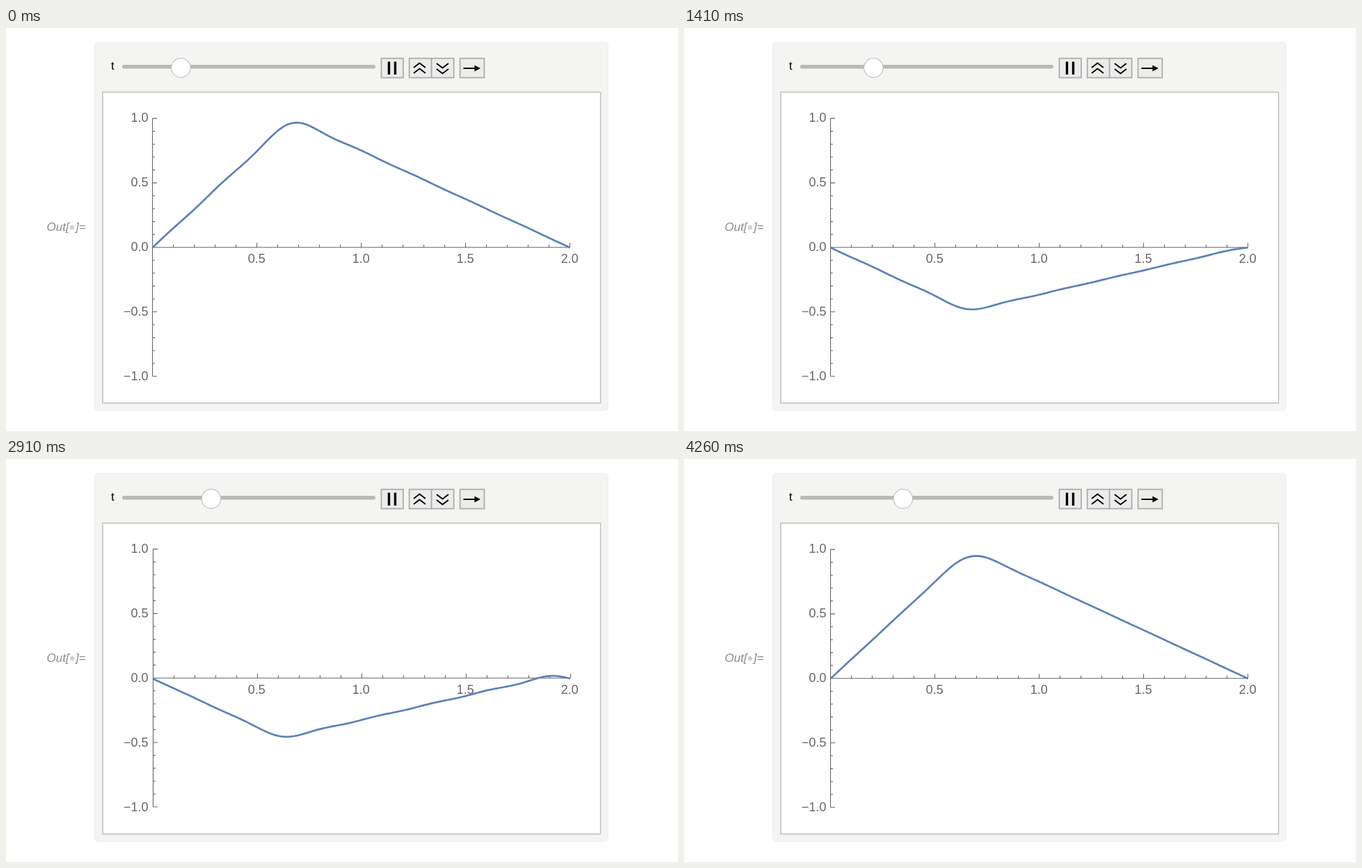
An HTML page for the animation above (4.29 s loop, 966 by 580 pixels).

```html
<!DOCTYPE html>
<html>
<head>
<meta charset="utf-8">
<style>
html, body { margin: 0; width: 100%; height: 100%; overflow: hidden; background: #fff; }
svg { display: block; }
text { font-family: "Liberation Sans", Arial, sans-serif; font-size: 18px; fill: #666; }
.out { font-size: 17px; font-style: italic; fill: #8c8c8c; }
.button { fill: #ececeb; stroke: #adadad; stroke-width: 1.8; }
.icon { fill: none; stroke: #000; stroke-width: 2; }
</style>
</head>
<body>
<svg width="966" height="580" viewBox="0 0 966 580">
  <rect x="127.5" y="20.5" width="738" height="530" rx="5" fill="#f4f4f3" stroke="#efefee"/>
  <rect x="139" y="92.3" width="715.6" height="447.4" fill="#fff" stroke="#bcbcba" stroke-width="1.4"/>

  <text x="58.5" y="292" class="out">Out[</text>
  <circle cx="95" cy="287" r="3.2" fill="#d0d0d0"/>
  <text x="100" y="292" class="out">]=</text>

  <text x="151" y="60" style="font-size:17px;fill:#000">t</text>
  <rect x="167" y="53" width="364" height="5.6" rx="2.5" fill="#b9b9b8"/>
  <circle id="thumb" cy="57.3" r="13.8" fill="#fff" stroke="#bdbdbd" stroke-width="1.1"/>

  <g class="button">
    <rect x="539.5" y="43.7" width="31.5" height="27.8"/>
    <rect x="579.7" y="43.7" width="32" height="27.8"/>
    <rect x="611.7" y="43.7" width="32" height="27.8"/>
    <rect x="652.7" y="43.7" width="34.8" height="27.8"/>
  </g>
  <g class="icon">
    <path d="M550.5 48.5v18.5M559.5 48.5v18.5" stroke-width="3.4"/>
    <path d="M586 57l8.5-6.5 8.5 6.5M586 65l8.5-6.5 8.5 6.5"/>
    <path d="M619 51l8.5 6.5 8.5-6.5M619 59l8.5 6.5 8.5-6.5"/>
    <path d="M657.5 58h18"/>
    <path d="M673.5 53.5l8.5 4.5-8.5 4.5z" fill="#000" stroke="none"/>
  </g>

  <path id="axes" fill="none" stroke="#666" stroke-width="1.1"/>
  <g id="labels"></g>
  <path id="curve" fill="none" stroke="#5e81b5" stroke-width="2.7" stroke-linejoin="round"/>
</svg>
<script>
const $ = id => document.getElementById(id);
const LOOP = 4290, TERMS = 15, LENGTH = 2, PLUCK = 2 / 3;
const X_UNIT = 300, Y_UNIT = 185.6;

// Times (ms) and how far the wave has travelled by then
const travel = [[0, .025], [420, .403], [960, .906], [1950, 1.824],
                [2910, 2.715], [3600, 3.358], [4260, 3.945]];
// Spans in which the picture stands still
const holds = [[0, 90], [420, 510], [540, 630], [960, 1050], [1620, 1830],
               [1950, 2040], [2820, 2910], [3390, 3480], [3600, 3690]];

function heldTime(ms) {
  const hold = holds.find(([from, to]) => ms >= from && ms < to);
  return hold ? hold[0] : Math.floor(ms / 30) * 30;
}

function travelled(ms) {
  const i = Math.max(1, travel.findIndex(key => key[0] >= ms));
  const [t0, s0] = travel[i - 1], [t1, s1] = travel[i];
  return s0 + (s1 - s0) * (ms - t0) / (t1 - t0);
}

// Fourier series of a string plucked at PLUCK to height 1
const scale = 2 * LENGTH ** 2 / (Math.PI ** 2 * PLUCK * (LENGTH - PLUCK));
function height(x, s) {
  let sum = 0;
  for (let n = 1; n <= TERMS; n++) {
    const k = n * Math.PI / LENGTH;
    sum += Math.sin(k * PLUCK) / n ** 2 * Math.sin(k * x) * Math.cos(k * s);
  }
  return scale * sum;
}

function axesPath(x0, y0) {
  let d = `M${x0} ${y0 - Y_UNIT}V${y0 + Y_UNIT}M${x0} ${y0}h${2 * X_UNIT}`;
  for (let i = -10; i <= 10; i++)
    d += `M${x0} ${y0 - i * Y_UNIT / 10}h${i % 5 ? 3.5 : 6.5}`;
  for (let i = 1; i <= 20; i++)
    d += `M${x0 + i * X_UNIT / 10} ${y0}v${i % 5 ? -4 : -6.5}`;
  return d;
}

function label(value, x, y, anchor) {
  const text = value.toFixed(1).replace("-", "\u2212");
  return `<text x="${x}" y="${y}" text-anchor="${anchor}">${text}</text>`;
}

$("labels").innerHTML =
  [-1, -.5, 0, .5, 1].map(v => label(v, 204.5, 321 - v * Y_UNIT, "end")).join("") +
  [.5, 1, 1.5, 2].map(v => label(v, 210.3 + v * X_UNIT, 338.3, "middle")).join("");

function draw(ms) {
  const s = travelled(heldTime(ms));
  const heights = Array.from({ length: 201 }, (_, i) => height(i / 100, s));
  $("curve").setAttribute("d", "M" + heights.map((h, i) =>
    `${(210.8 + i * X_UNIT / 100).toFixed(2)} ${(316 - h * Y_UNIT).toFixed(2)}`).join("L"));
  $("thumb").setAttribute("cx", 251 + 16.2 * s);

  // The axes shift slightly while the curve lies on both sides of zero
  const mixed = Math.min(...heights) < -.01 && Math.max(...heights) > .01;
  $("axes").setAttribute("d", mixed ? axesPath(211.5, 315.2) : axesPath(210.6, 315.7));
}

const start = performance.now();
function tick() {
  draw((performance.now() - start) % LOOP);
  requestAnimationFrame(tick);
}
tick();
</script>
</body>
</html>
```
